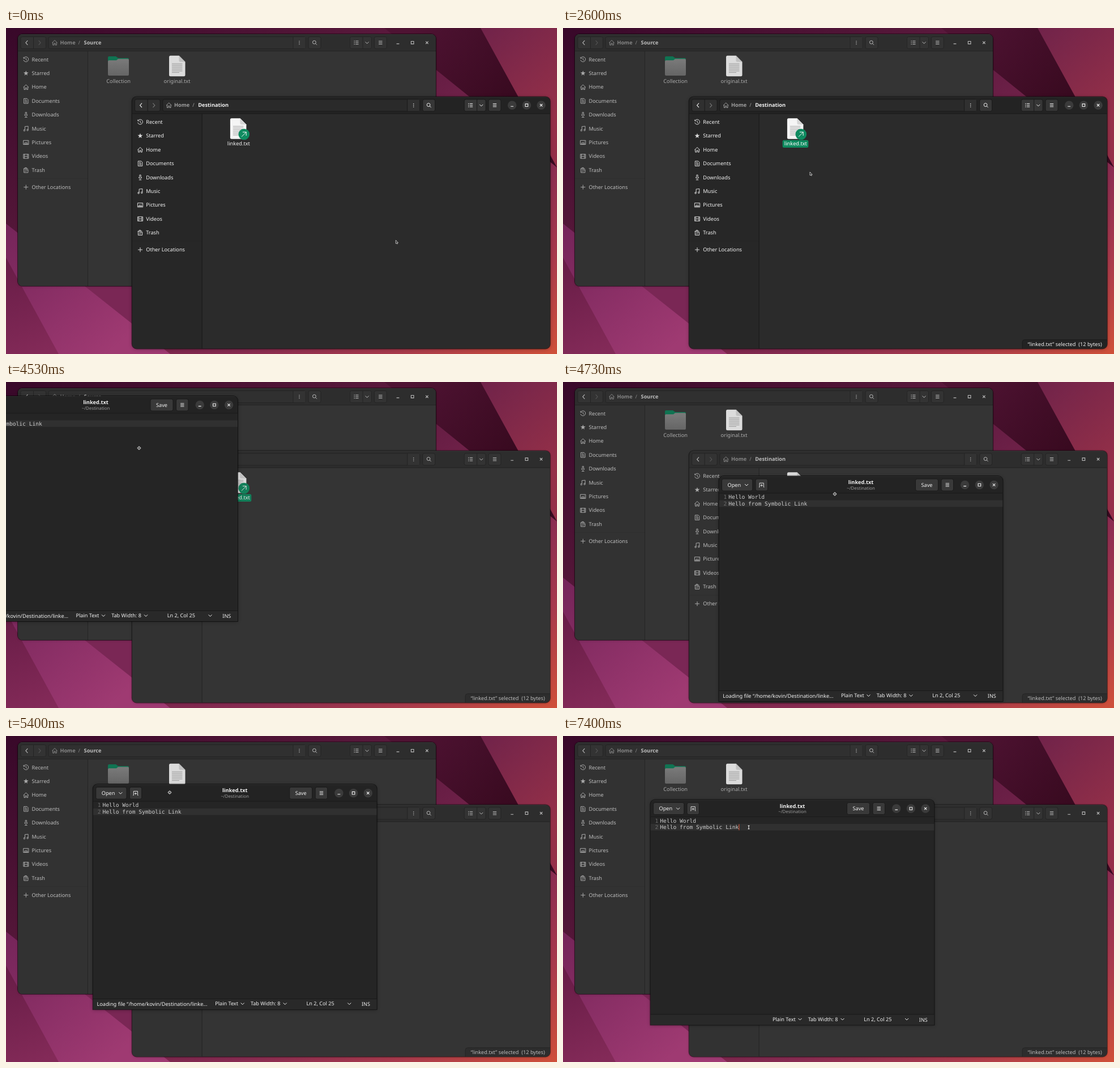
Write an HTML page that moves like this. It is 973 by 575 pixels and loops after 8000 ms.

```html
<!DOCTYPE html>
<html lang="en">
<head>
<meta charset="utf-8">
<title>Symbolic link demo</title>
<style>
html, body { margin: 0; width: 100%; height: 100%; overflow: hidden; background: #3a0a2b; }
#stage { position: relative; width: 973px; height: 575px; overflow: hidden; }
svg { position: absolute; left: 0; top: 0; display: block; }
text { font: 9.2px "Noto Sans", sans-serif; fill: var(--fg); white-space: pre; text-rendering: geometricPrecision; }
.b { font-weight: 700; }
.dim { fill: var(--dim); }
.mid { text-anchor: middle; }
.end { text-anchor: end; }
.sub { font-size: 7.8px; fill: #9c9c9c; }
.bar { font-size: 9.1px; }
.mono { font: 9.65px "DejaVu Sans Mono", monospace; fill: #cdcdcd; }
.num { fill: #6c6c6c; }
.win { position: absolute; left: 0; top: 0; overflow: hidden; border-radius: 8px; background: var(--bg); }
.on {
  --bg: #2b2b2b; --side: #272727; --head: #232323; --btn: #363636; --group: #303030; --field: #2a2a2a; --edge: #1a1a1a;
  --fg: #f2f2f2; --dim: #a0a0a0; --ico: #d8d8d8; --off: #777;
  box-shadow: 0 0 0 1px rgba(0,0,0,.6), 0 1px 6px rgba(0,0,0,.3);
}
.off {
  --bg: #343434; --side: #323232; --head: #2d2d2d; --btn: #333; --group: #333; --field: #303030; --edge: #242424;
  --fg: #bcbcbc; --dim: #868686; --ico: #a9a9a9; --off: #555;
  box-shadow: 0 0 0 1px rgba(0,0,0,.55), 0 1px 4px rgba(0,0,0,.2);
}
.off .files { opacity: .87; }
.picked .pick { visibility: visible; }
.pick { visibility: hidden; }
.picked .link text { fill: #fff; }
.hover .link .pic { filter: brightness(1.12); }
#editor { border-radius: 8px 8px 0 0; --bg: #252525; --btn: #393939; }
</style>
</head>
<body>
<div id="stage"></div>
<script>
const stage = document.getElementById('stage');

// Drawing helpers
const text = (x, y, s, cls = '') => `<text x="${x}" y="${y}" class="${cls}">${s}</text>`;
const rect = (x, y, w, h, fill, extra = '') => `<rect x="${x}" y="${y}" width="${w}" height="${h}" fill="${fill}" ${extra}/>`;
const box = (x, y, w, fill = 'var(--btn)') => rect(x, y, w, 21, fill, 'rx="3" stroke="var(--edge)"');
const poly = (pts, fill) => `<polygon points="${pts}" fill="${fill}"/>`;
const svg = (w, h, body) => `<svg width="${w}" height="${h}" viewBox="0 0 ${w} ${h}">${body}</svg>`;
const grad = (id, dir, stops) => `<linearGradient id="${id}" gradientUnits="userSpaceOnUse" ${dir}>` +
  stops.map(([o, c]) => `<stop offset="${o}" stop-color="${c}"/>`).join('') + '</linearGradient>';

const icons = {
  recent: 'M-3.9-2.4A4.4 4.4 0 1 1-4.3.8M-4.2-4.3V-2H-1.9M0-2.6V.3L1.9 1.7',
  home: 'M-4.7.4L0-4.2L4.7.4M-3.3-.8V4.3H-1V1.2H1.1V4.3H3.3V-.8',
  documents: 'M-3.7-4.3H1.8L3.7-2.4V4.3H-3.7ZM-2-2H1M-2 0H2M-2 2.1H2',
  downloads: 'M-1.1-4.3H1.1V.2H2.8L0 2.9L-2.8.2H-1.1ZM-2.2 4.4H2.2',
  music: 'M-1.9 2.8V-3.7L3.8-4.3V2.2M-4 3.2a1.1 1.1 0 1 0 2.1-.3a1.1 1.1 0 1 0-2.1.3M1.7 2.6a1.1 1.1 0 1 0 2.1-.3a1.1 1.1 0 1 0-2.1.3',
  pictures: 'M-4.6-3.6H4.6V3.6H-4.6ZM-3.2 2.2L-1-.4L.4 1L1.6 0L3.2 2.2ZM1.8-1.7h.8',
  videos: 'M-4.5-3.7H4.5V3.7H-4.5ZM-2.7-3.7V3.7M2.7-3.7V3.7M-2.7 0H2.7',
  trash: 'M-4.5-2.5H3.5M-2-2.5V-4.3H1V-2.5M-3.6-2.5V4.3H3.6V-.4M-1.7-.4H4.3M-1.5 1.2V2.8M.6 1.2V2.8',
  plus: 'M-4 0H4M0-4V4',
  back: 'M1.7-3.8L-1.7 0L1.7 3.8',
  next: 'M-1.7-3.8L1.7 0L-1.7 3.8',
  down: 'M-3-1.5L0 1.5L3-1.5',
  search: 'M2.3-.6a2.9 2.9 0 1 0-5.8 0a2.9 2.9 0 1 0 5.8 0M1.5 1.5L4 4',
  list: 'M-4-2.8h1.6M-1.2-2.8H4M-4 0h1.6M-1.2 0H4M-4 2.8h1.6M-1.2 2.8H4',
  menu: 'M-3.2-2.6H3.2M-3.2 0H3.2M-3.2 2.6H3.2',
  dots: 'M-.6-2.7H.6M-.6 0H.6M-.6 2.7H.6',
  tab: 'M-4.6 3.8H-3.6V-3.4H3.6V3.8H4.6M0-1.4V2.8M-2.1.7H2.1',
  min: 'M-2.4 2.1H2.4',
  max: 'M-2.3-2.3H2.3V2.3H-2.3Z',
  close: 'M-2.2-2.2L2.2 2.2M2.2-2.2L-2.2 2.2'
};
const icon = (name, x, y, color = 'var(--ico)', w = 1) =>
  `<path d="${icons[name]}" transform="translate(${x} ${y})" fill="none" stroke="${color}" stroke-width="${w}"/>`;
const star = (x, y) => {
  const pts = Array.from({ length: 10 }, (_, i) => {
    const r = i % 2 ? 1.9 : 4.7, a = i * Math.PI / 5;
    return `${(x + r * Math.sin(a)).toFixed(2)},${(y - r * Math.cos(a)).toFixed(2)}`;
  });
  return poly(pts.join(' '), 'var(--ico)');
};
const controls = (x, y, circles) => ['min', 'max', 'close'].map((n, i) => {
  const cx = x + i * 25.7;
  return (circles ? `<circle cx="${cx}" cy="${y}" r="7.7" fill="#3b3b3b"/>` : '') + icon(n, cx, y, 'var(--fg)', 1.1);
}).join('');

// File icons
const page = (x, y) => {
  let s = `<path d="M${x + 2.5} ${y}H${x + 17.5}L${x + 28.5} ${y + 11}V${y + 34}q0 2.5-2.5 2.5H${x + 2.5}q-2.5 0-2.5-2.5V${y + 2.5}q0-2.5 2.5-2.5Z" fill="#f5f5f5"/>` +
    `<path d="M${x + 17.5} ${y}V${y + 8.5}q0 2.5 2.5 2.5H${x + 28.5}Z" fill="#d6d6d6"/>`;
  for (let i = 0; i < 7; i++) s += rect(x + 5, y + 13.6 + i * 2.6, i === 6 ? 13 : 18.5, 1, '#a9a9a9');
  return s;
};
const folder = (x, y) =>
  `<path d="M${x} ${y + 32}V${y + 2}q0-2 2-2H${x + 14}l4 3H${x + 35}q2 0 2 2V${y + 20}Z" fill="#0b7d57"/>` +
  `<path d="M${x} ${y + 9}q0-2 2-2H${x + 14}q1.5 0 2.5-1.2t2.5-1.2H${x + 35}q2 0 2 2V${y + 32}q0 2-2 2H${x + 2}q-2 0-2-2Z" fill="url(#front)"/>`;
const sourceFiles = folder(159, 39) + text(177.6, 86, 'Collection', 'mid') +
  page(267, 37.8) + text(281, 86, 'original.txt', 'mid');
const linkFile = `<g class="link"><g class="pic">${page(173.2, 37.8)}` +
  '<circle cx="197.6" cy="66.1" r="9.8" fill="#0f8b60"/>' +
  '<path d="M193.4 70.3L201.4 62.3M195.2 62.2H201.5V68.5" fill="none" stroke="#fff" stroke-width=".95"/></g>' +
  rect(165, 76.4, 45.6, 13.2, '#0f8a5f', 'rx="2.5" class="pick"') +
  text(188.2, 86, 'linked.txt', 'mid') + '</g>';

const places = ['Recent', 'Starred', 'Home', 'Documents', 'Downloads', 'Music', 'Pictures', 'Videos', 'Trash'];

function fileWindow(name, files, active) {
  let s = rect(0, 30, 123.5, 414, 'var(--side)') + rect(123, 30, 1, 414, 'var(--edge)') +
    rect(0, 0, 738, 30, 'var(--head)') + rect(0, 0, 738, 1, 'rgba(255,255,255,.06)') + rect(0, 29.2, 738, 1, 'var(--edge)');
  s += box(4.8, 4.5, 44.7, 'var(--group)') + rect(27, 4.5, 1, 21, 'var(--edge)') + icon('back', 15.6, 15, 'var(--fg)', 1.1) + icon('next', 38.4, 15, 'var(--off)', 1.1);
  s += box(54, 4.5, 454, 'var(--field)') + rect(486, 5, 21.5, 20, 'var(--group)') + rect(485.5, 4.5, 1, 21, 'var(--edge)') + icon('dots', 497, 15, 'var(--fg)', 1.3);
  s += icon('home', 65, 14.8, 'var(--dim)') + text(74.4, 18.1, 'Home', 'b dim') + text(106.5, 18.1, '/', 'dim') + text(116.6, 18.1, name, 'b');
  s += box(513, 4.5, 22) + icon('search', 524, 14.8, 'var(--fg)');
  s += box(586.5, 4.5, 38) + rect(608.5, 4.5, 1, 21, 'var(--edge)') + icon('list', 597.5, 14.8, 'var(--fg)') + icon('down', 616.6, 15, 'var(--fg)');
  s += box(629.3, 4.5, 22) + icon('menu', 640.3, 14.8, 'var(--fg)') + controls(671, 14.8, active);
  places.forEach((p, i) => {
    const y = 44.5 + i * 24.4;
    s += (p === 'Starred' ? star(14.3, y) : icon(p.toLowerCase(), 14.3, y)) + text(24.5, y + 3.1, p);
  });
  s += rect(0, 254, 123, 1, 'rgba(0,0,0,.08)') + icon('plus', 14.3, 269.7) + text(24.5, 272.8, 'Other Locations');
  s += `<g class="files">${files}</g>`;
  if (files === linkFile) {
    s += '<g class="pick"><path d="M588.5 445V432.5q0-4 4-4H739V445Z" fill="var(--head)" stroke="var(--edge)"/>' +
      text(729, 439.3, '“linked.txt” selected\u00a0 (12 bytes)', 'end') + '</g>';
  }
  return svg(738, 444, s);
}

function editorWindow() {
  let s = rect(0, 0, 501, 30, 'var(--head)') + rect(0, 0, 501, 1, 'rgba(255,255,255,.06)') + rect(0, 29.5, 501, 1, 'var(--edge)');
  s += box(5, 5, 54.3) + text(15, 18.5, 'Open') + icon('down', 48.6, 15.5, 'var(--fg)');
  s += box(64.5, 5, 21.5) + icon('tab', 75.2, 15.6, 'var(--fg)', 0.9);
  s += text(250.5, 14, 'linked.txt', 'b mid') + text(250.5, 23.6, '~/Destination', 'sub mid');
  s += box(347, 5, 40) + text(367, 18.5, 'Save', 'mid') + box(392.5, 5, 21.5) + icon('menu', 403.3, 15.5, 'var(--fg)') + controls(434.2, 15.5, true);
  s += rect(0, 42.6, 501, 11.6, '#303030');
  ['Hello World', 'Hello from Symbolic Link'].forEach((line, i) => {
    const y = 40.3 + i * 11.6;
    s += text(8, y, i + 1, 'mono num') + text(16.8, y, line, 'mono');
  });
  s += rect(155.9, 43, 1, 10.8, '#e95a3a', 'id="caret"');
  s += rect(0, 378.5, 501, 19, '#292929') + rect(0, 378, 501, 1, '#191919');
  s += `<g id="loading">${text(6.7, 390.7, 'Loading file “/home/kovin/Destination/linke…')}</g>`;
  s += text(215.5, 390.2, 'Plain Text', 'bar') + text(278.2, 390.2, 'Tab Width: 8', 'bar') + text(376.8, 390.2, 'Ln 2, Col 25', 'bar') + text(474.3, 391, 'INS', 'bar');
  for (const x of [264, 339, 452.6]) s += icon('down', x, 387, 'var(--fg)');
  return svg(501, 397, s);
}

const wallpaper = svg(973, 575, '<defs>' +
  grad('sky', 'x1="0" y1="0" x2="532" y2="851"', [[0, '#380829'], [.3, '#531638'], [.5, '#6a1f46'], [.7, '#872b51'], [.85, '#a83a4c'], [1, '#cf5039']]) +
  grad('ridge', 'x1="838" y1="0" x2="973" y2="150"', [[0, '#70234a'], [1, '#953048']]) +
  grad('dark', 'x1="720" y1="0" x2="880" y2="130"', [[0, '#4f1333'], [1, '#390a20']]) +
  grad('petal', 'x1="0" y1="360" x2="180" y2="575"', [[0, '#76255a'], [1, '#9f3a72']]) +
  grad('slope', 'x1="0" y1="405" x2="60" y2="575"', [[0, '#671c46'], [1, '#832a58']]) +
  grad('front', 'x1="0" y1="44" x2="0" y2="73"', [[0, '#858585'], [1, '#6d6d6d']]) + '</defs>' +
  rect(0, 0, 973, 575, 'url(#sky)') +
  poly('838,0 973,0 973,246', 'url(#ridge)') + poly('668,0 838,0 973,246', 'url(#dark)') +
  poly('100,425 222,425 222,522', '#7a2755') +
  poly('0,345 0,575 290,575', 'url(#petal)') + poly('0,405 0,575 93,575', 'url(#slope)'));

const win = (id, cls, x, y, w, h, body) =>
  `<div id="${id}" class="win ${cls}" style="width:${w}px;height:${h}px;transform:translate(${x}px,${y}px)">${body}</div>`;

stage.innerHTML = wallpaper +
  win('source', 'off', 21, 11, 738, 444, fileWindow('Source', sourceFiles, false)) +
  win('destOff', 'off', 222.7, 121.4, 738, 444, fileWindow('Destination', linkFile, false)) +
  win('destOn', 'on', 222.7, 121.4, 738, 444, fileWindow('Destination', linkFile, true)) +
  win('editor', 'on', 0, 0, 501, 396.5, editorWindow()) +
  svg(973, 575, '<g id="pointer"></g>');
const [destOff, destOn, editor, caret, loading, pointer] =
  ['destOff', 'destOn', 'editor', 'caret', 'loading', 'pointer'].map(id => document.getElementById(id));

const shapes = {
  arrow: '<path d="M0 0V5.9L1.3 4.8L2.2 6.6L3.3 6.1L2.5 4.3H4.1Z" fill="#1c1c1c" stroke="#e8e8e8" stroke-width=".75"/>',
  move: '<path d="M0-3.6L3.6 0L0 3.6L-3.6 0Z" fill="#dcdcdc"/><path d="M-2.3 0H2.3M0-2.3V2.3" stroke="#222" stroke-width="1"/>',
  beam: '<path d="M-1.7-3H1.7M0-3V3M-1.7 3H1.7" stroke="#111" stroke-width="2.6"/><path d="M-1.5-2.9H1.5M0-2.9V2.9M-1.5 2.9H1.5" stroke="#f4f4f4" stroke-width="1.2"/>'
};

// Motion tables: [tick, x, y], 15 ticks per second
const TICK = 1000 / 15, TICKS = 120, DRAG = 67, DROP = 93, BLUR = 44;
const drag = [[67, -290, -60], [68, -92, 25], [69, 86, 101], [70, 220, 150], [72, 331, 182], [73, 318, 170], [75, 245, 134],
  [76, 210.5, 120.8], [77, 207, 116], [79, 174, 116], [81, 153.7, 85.2], [82, 140, 84], [84, 137.5, 77],
  [86, 139, 84], [90, 152, 105.8], [92, 153.5, 111.5], [93, 154.5, 112.5]];
const before = [[7, 688.3, 374.3], [10, 632, 344], [14, 500, 260], [17, 432, 210], [20, 411, 194.5], [22, 409.5, 200],
  [34, 409.5, 200], [36, 418, 222], [39, 436, 254], [41, 436, 254], [45, 330, 180], [49, 120, 60], [52, -9, -12],
  [55, -9, -12], [56, -2, -3], [58, 0, -1], [60, -1, -2], [61, -9, -12]];
const after = [[98, 303.5, 128], [100, 293, 127], [103, 312, 165], [104, 322, 178], [106, 331, 166], [107, 331.5, 162.5],
  [108, 331.5, 162.5], [111, 328, 161]];

function along(keys, n) {
  const i = keys.findIndex(k => k[0] >= n);
  if (i < 0) return keys[keys.length - 1].slice(1);
  if (i === 0) return keys[0].slice(1);
  const [n0, x0, y0] = keys[i - 1], [n1, x1, y1] = keys[i], f = (n - n0) / (n1 - n0);
  return [x0 + (x1 - x0) * f, y0 + (y1 - y0) * f];
}

let last = -1, shape = '';
function draw(n) {
  const [ex, ey] = along(drag, n);
  let kind = 'arrow', x, y;
  if (n < DRAG) [x, y] = along(before, n);
  else if (n <= DROP + 2) {
    // The window trails the pointer by one tick
    kind = 'move';
    [x, y] = along(drag, n + 1);
    x += 149;
    y += 15.5;
  } else {
    [x, y] = along(after, n);
    if (y > ey + 30) kind = 'beam';
  }
  if (kind !== shape) pointer.innerHTML = shapes[shape = kind];
  pointer.setAttribute('transform', `translate(${x} ${y})`);

  editor.style.visibility = n >= DRAG ? 'visible' : 'hidden';
  editor.style.transform = `translate(${ex}px,${ey}px)`;
  loading.style.opacity = n < 86 ? 1 : 0;
  caret.style.opacity = n >= 110 ? 1 : 0;
  destOff.style.opacity = n > BLUR ? 1 : 0;
  destOn.style.opacity = Math.max(0, Math.min(1, 1 - (n - BLUR) / 3));
  stage.classList.toggle('picked', n >= 29);
  stage.classList.toggle('hover', n < DRAG && x > 396 && x < 425 && y > 159 && y < 211);
}

const start = performance.now();
function frame() {
  const n = Math.floor((performance.now() - start + 5) / TICK) % TICKS;
  if (n !== last) draw(last = n);
  requestAnimationFrame(frame);
}
frame();
</script>
</body>
</html>
```
